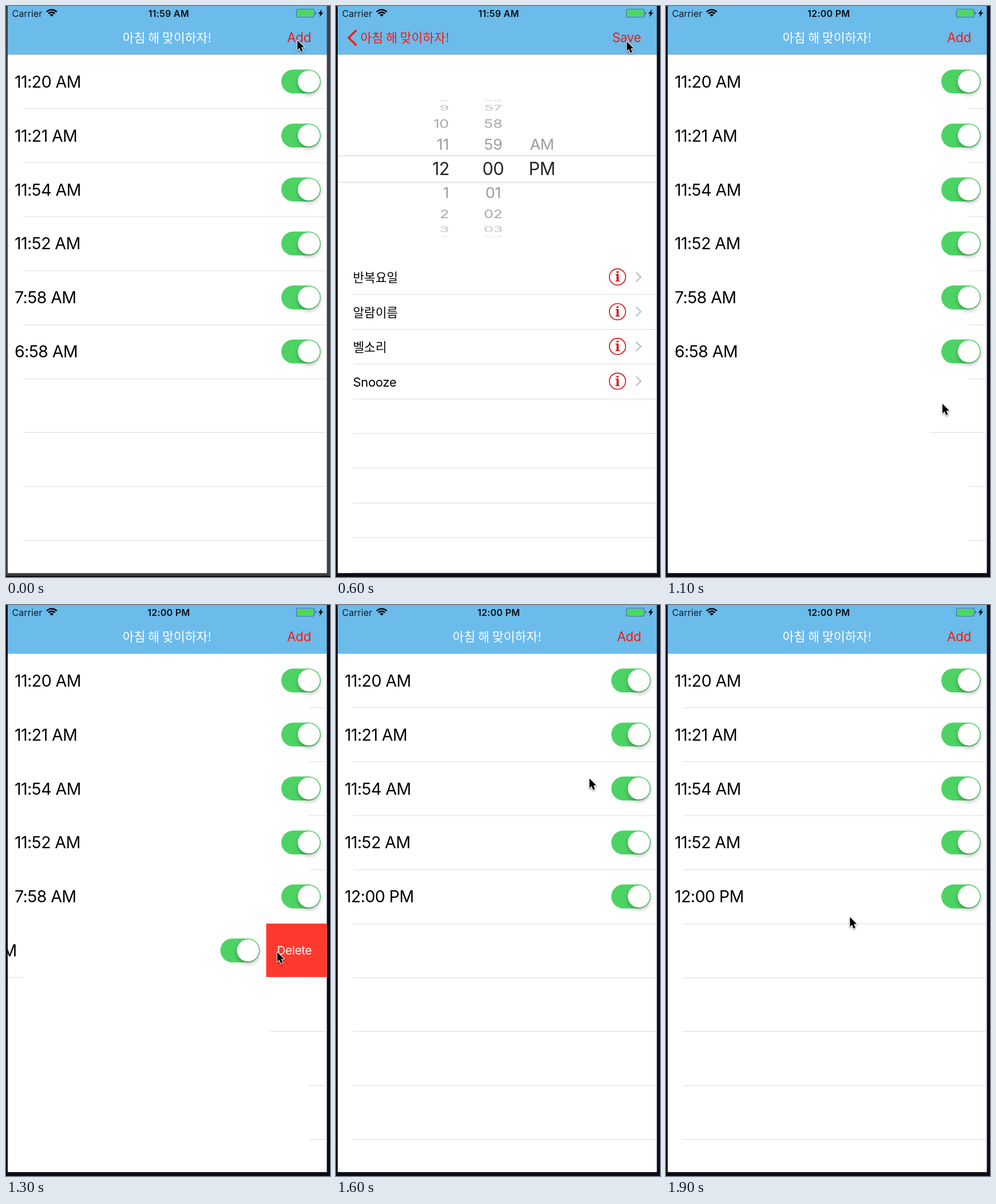
These frames come from a looping animation (564x993 px, 2 s). An HTML page with a canvas:

```html
<!DOCTYPE html>
<html lang="ko">
<head>
<meta charset="utf-8">
<style>
html, body { margin: 0; width: 100%; height: 100%; overflow: hidden; background: #0b0c14; }
canvas { display: block; }
</style>
</head>
<body>
<canvas id="stage" width="564" height="993"></canvas>
<script>
const ctx = document.getElementById('stage').getContext('2d');
const LEFT = 3, RIGHT = 558.7, TOP = 85, BOTTOM = 986.4, WIDTH = RIGHT - LEFT;
const ROW = 93.9, CELL = 60.4;
const RED = '#f31a10', LINE = '#dcdcdf', GREEN = '#4cd364';
const TITLE = '아침 해 맞이하자!';
const LATIN = 'Inter, sans-serif';
const HANGUL = '"Noto Sans CJK KR", "Noto Sans CJK", sans-serif';

const base = ['11:20 AM', '11:21 AM', '11:54 AM', '11:52 AM'];
const six = [...base, '7:58 AM', '6:58 AM'];
const seven = [...six, '12:00 PM'];
const five = [...base, '12:00 PM'];

// One scene per 100 ms. slide: how far the editor stands right of its resting place.
const editor = (cursor, hour, minute) => ({ view: 'editor', cursor, hour, minute });
const list = (rows, cursor, more) => ({ view: 'list', rows, cursor, ...more });
const scenes = [
  list(six, [506, 58], { frame: '#3f4043' }),
  editor([506, 60], 11, 59),
  editor([380, 250], 11, 59),
  editor([385, 165], 11, 59.5),
  editor([460, 186], 12, 60),
  editor([480, 130], 12, 60),
  editor([505, 60], 12, 60),
  editor([508, 60], 12, 60),
  { view: 'slide', rows: seven, cursor: [509, 61], hour: 12, minute: 60, slide: 525, lineFrom: 560, back: '#62a6cd', bg: '#fafafa' },
  list(seven, [500, 400], { lineFrom: 528 }),
  list(seven, [471, 696], { lineFrom: 528, swiped: 6 }),
  list(six, [480, 690], { lineFrom: 528, cleared: 6 }),
  list(six, [510, 606], { lineFrom: 528, cleared: 6 }),
  list(six, [471, 602], { lineFrom: 528, cleared: 6, swiped: 5 }),
  list(six.slice(0, 5), [471, 508], { lineFrom: 528, cleared: 5, swiped: 4 }),
  { view: 'slide', rows: base, cursor: [507, 48], hour: 12, minute: 60, slide: 134, lineFrom: 130, back: '#d2231f', bg: '#e4e4e4' },
  list(five, [440, 300]),
  list(five, [319, 541], { alert: true }),
  list(five, [319, 541]),
  list(five, [319, 541])
];

function rect(x, y, w, h, color) {
  ctx.fillStyle = color;
  ctx.fillRect(x, y, w, h);
}

function text(str, x, cy, size, color, { align = 'left', weight = 400, font, spacing = -0.015 } = {}) {
  const hangul = /[가-힣]/.test(str);
  ctx.font = `${weight} ${size}px ${font || (hangul ? HANGUL : LATIN)}`;
  ctx.letterSpacing = hangul ? '0px' : `${spacing * size}px`;
  ctx.textAlign = align;
  ctx.fillStyle = color;
  ctx.fillText(str, x, cy + size * 0.365);
}

function polyline(points, color, width) {
  ctx.beginPath();
  points.forEach(([x, y]) => ctx.lineTo(x, y));
  ctx.strokeStyle = color;
  ctx.lineWidth = width;
  ctx.stroke();
}

function disc(x, y, r, color) {
  ctx.beginPath();
  ctx.arc(x, y, r, 0, Math.PI * 2);
  ctx.fillStyle = color;
  ctx.fill();
}

function pill(x, y, w, h, r, color) {
  ctx.beginPath();
  ctx.roundRect(x, y, w, h, r);
  ctx.fillStyle = color;
  ctx.fill();
}

function clipped(x, y, w, h, draw) {
  ctx.save();
  ctx.beginPath();
  ctx.rect(x, y, w, h);
  ctx.clip();
  draw();
  ctx.restore();
}

function shadow(color, blur, dy) {
  ctx.shadowColor = color;
  ctx.shadowBlur = blur;
  ctx.shadowOffsetY = dy;
}

function toggle(cy, color) {
  pill(479.2, cy - 20.8, 68.6, 41.6, 20.8, color);
  ctx.save();
  shadow('rgba(0,0,0,.28)', 7, 4);
  disc(527.2, cy, 19.2, '#fff');
  ctx.restore();
}

function drawList(s, shift) {
  rect(LEFT, TOP, WIDTH, BOTTOM - TOP, s.bg || '#fff');
  for (let i = 0; i < 9; i++) {
    const y = Math.round(178 + i * ROW);
    const from = s.cleared === i ? 459 : s.lineFrom || 30;
    rect(from, y, Math.max(0, RIGHT - from), 1, s.bg === '#e4e4e4' ? '#cdcdcd' : LINE);
  }
  s.rows.forEach((label, i) => {
    const cy = 131.3 + i * ROW, open = s.swiped === i;
    ctx.save();
    ctx.translate(shift - (open ? 106 : 0), 0);
    text(label, 15, cy, 28.5, '#000', { spacing: -0.021 });
    toggle(cy, s.alert ? '#8a848c' : GREEN);
    ctx.restore();
    if (open) {
      const top = Math.round(cy - 46.8);
      rect(LEFT, top + 93, 27, 1, LINE);
      rect(453, top, 106, 93, '#fe3a2f');
      text('Delete', 502, cy, 20.5, '#fff', { align: 'center' });
    }
  });
}

// Wheel column: each item lies on a drum of radius 120.
function wheel(pos, label, x, align) {
  const tones = ['#262626', '#9c9c9c', '#a9a9a9', '#c2c2c2', '#d8d8d8'];
  for (let n = Math.ceil(pos - 4.2); n <= pos + 4.2; n++) {
    const str = label(n);
    if (!str) continue;
    const d = n - pos, angle = d * 0.357;
    const near = Math.round(Math.abs(d));
    ctx.save();
    ctx.translate(x - (align === 'right' && near ? 1 : 0), 283 + 120 * Math.sin(angle));
    ctx.scale(1, Math.max(0.1, Math.cos(angle)));
    text(str, 0, 0, near ? 27 : 30.5, tones[near], { align });
    ctx.restore();
  }
}

function info(cy) {
  ctx.beginPath();
  ctx.arc(490, cy, 14.1, 0, Math.PI * 2);
  ctx.strokeStyle = '#d9171a';
  ctx.lineWidth = 1.7;
  ctx.stroke();
  text('i', 490, cy - 0.5, 24, '#d9171a', { align: 'center', weight: 600, font: '"Noto Serif", serif' });
  polyline([[522.5, cy - 8], [530.5, cy], [522.5, cy + 8]], '#c5c5ca', 2.7);
}

function drawEditor(s, shift) {
  ctx.save();
  ctx.translate(shift, 0);
  rect(LEFT, TOP, WIDTH, BOTTOM - TOP, '#fff');
  clipped(LEFT, 163, WIDTH, 239, () => {
    wheel(s.hour, n => String((n + 11) % 12 + 1), 197.5, 'right');
    wheel(s.minute, n => String((n + 60) % 60).padStart(2, '0'), 273.5, 'center');
    wheel(s.hour > 11 ? 1 : 0, n => ['AM', 'PM'][n], 358.5, 'center');
  });
  rect(LEFT, 260, WIDTH, 1, '#cfcfd1');
  rect(LEFT, 306, WIDTH, 1, '#cfcfd1');
  ['반복요일', '알람이름', '벨소리', 'Snooze'].forEach((label, i) => {
    const cy = 471.2 + i * CELL;
    text(label, 29.5, cy + 1.5, label === 'Snooze' ? 22 : 21.3, '#000');
    info(cy);
  });
  for (let i = 0; i < 9; i++) rect(30, Math.round(501.4 + i * CELL), 529, 1, LINE);
  ctx.restore();
}

function statusBar(clock) {
  text('Carrier', 10.5, 13, 16, '#111c24', { spacing: 0.002 });
  for (const [r, w] of [[12, 2.7], [7.6, 2.7], [2.2, 4.4]]) {
    ctx.beginPath();
    ctx.arc(79.5, 18.5, r, -Math.PI * 0.76, -Math.PI * 0.24);
    ctx.strokeStyle = '#000';
    ctx.lineWidth = w;
    ctx.stroke();
  }
  text(clock, 283.2, 13, 16, '#0a0e12', { align: 'center', weight: 600, spacing: 0.015 });
}

function battery() {
  ctx.beginPath();
  ctx.roundRect(505.5, 5.5, 31, 14, 3);
  ctx.strokeStyle = '#42708d';
  ctx.lineWidth = 1.2;
  ctx.stroke();
  pill(507, 7, 28, 11, 1.5, '#4bd860');
  pill(538, 10, 1.8, 5, 1, '#42708d');
  ctx.beginPath();
  [[550, 5.5], [543.5, 13.5], [547.3, 13.5], [545.5, 19.5], [552.2, 11.2], [548.4, 11.2]]
    .forEach(([x, y]) => ctx.lineTo(x, y));
  ctx.fillStyle = '#000';
  ctx.fill();
}

function backArrow(color) {
  polyline([[35.5, 42], [22, 55.2], [35.5, 68.5]], color, 3.3);
}

function navBar(s, clock) {
  rect(LEFT, 0, WIDTH, 84, s.alert ? '#50b8ee' : '#6bbbeb');
  rect(LEFT, 84, WIDTH, 1, '#a9c0ce');
  statusBar(clock);
  const action = (label, color) => text(label, 531, 55, 22.3, color, { align: 'right' });
  if (s.view === 'editor') {
    backArrow(RED);
    text(TITLE, 42.5, 55, 21.5, RED);
    action('Save', RED);
  } else if (s.view === 'list') {
    text(TITLE, 280.5, 55, 21.5, '#fff', { align: 'center', weight: 500 });
    action('Add', RED);
  } else {
    const entering = s.slide < WIDTH / 2;
    backArrow(s.back);
    if (entering) text(TITLE, 42.5 + s.slide * 0.33, 55, 21.5, '#d86c70');
    else text(TITLE, 272.5, 55, 21.5, '#fff', { align: 'center', weight: 700 });
    action(entering ? 'Save' : 'Add', '#cb222a');
  }
}

function alertBox() {
  rect(LEFT, 0, WIDTH, BOTTOM, 'rgba(9,0,14,.43)');
  pill(99.3, 409.3, 362.4, 166.6, 18.5, '#f0f0f0');
  rect(99.3, 517, 362.4, 1, '#d9d9da');
  const center = { align: 'center' };
  text('알림', 280.5, 449, 21.5, '#000', { align: 'center', weight: 700 });
  text('시간됐어요', 280.5, 478, 16.4, '#000', center);
  text('끄기', 280.5, 546, 21.3, '#d7201f', center);
}

function pointer([x, y]) {
  ctx.save();
  ctx.translate(x + 0.5, y + 0.8);
  ctx.scale(0.88, 0.88);
  ctx.beginPath();
  [[0.8, 1], [0.8, 20], [5, 16], [8, 23.5], [11.6, 22], [8.6, 14.8], [14.2, 14.4]]
    .forEach(([px, py]) => ctx.lineTo(px, py));
  ctx.closePath();
  ctx.lineJoin = 'round';
  ctx.strokeStyle = '#fff';
  ctx.lineWidth = 2.4;
  shadow('rgba(0,0,0,.4)', 3, 1.5);
  ctx.stroke();
  ctx.shadowColor = 'transparent';
  ctx.fillStyle = '#000';
  ctx.fill();
  ctx.restore();
}

function draw(now) {
  const step = Math.floor(now % 2000 / 100);
  const s = scenes[step];
  rect(0, 0, 564, 993, '#0b0c14');
  if (s.frame) rect(0, 0, 564, 991, s.frame);
  clipped(LEFT, 0, WIDTH, BOTTOM, () => {
    const slide = s.slide || 0;
    // The list trails at 30% of the editor's travel.
    if (s.view !== 'editor') drawList(s, s.view === 'slide' ? -0.3 * (WIDTH - slide) : 0);
    if (s.view !== 'list') drawEditor(s, slide);
    navBar(s, step < 10 ? '11:59 AM' : '12:00 PM');
    if (s.alert) alertBox();
    battery();
  });
  pointer(s.cursor);
}

const start = performance.now();
function tick() {
  draw(performance.now() - start);
  requestAnimationFrame(tick);
}
tick();
</script>
</body>
</html>
```
